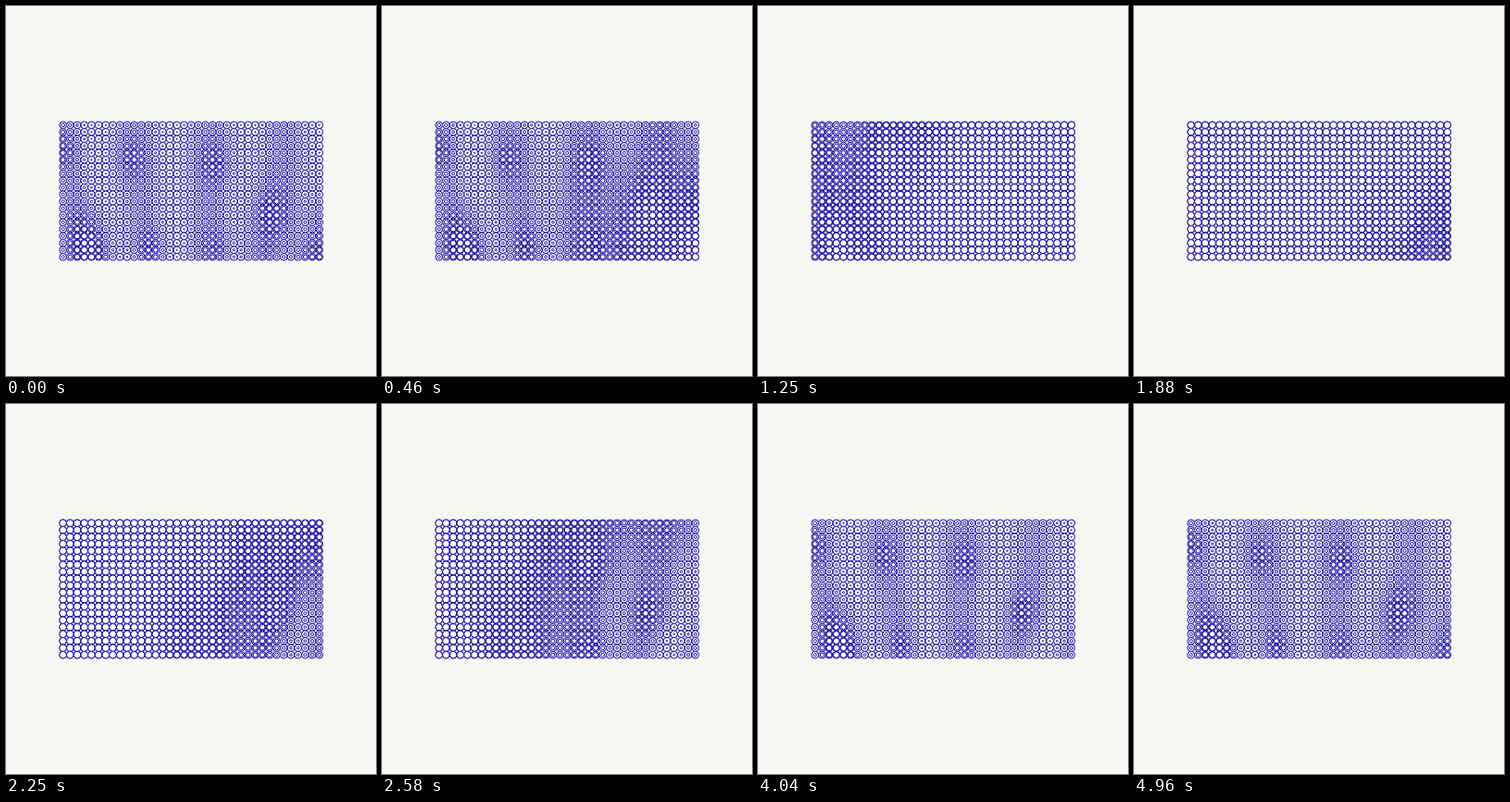
Write an HTML page with a canvas that moves like this. It is 400 by 400 pixels and loops after 5 s.

```html
<!DOCTYPE html>
<html lang="en">
<head>
<meta charset="utf-8">
<title>Ring wave</title>
<style>
  html, body { margin: 0; width: 100%; height: 100%; overflow: hidden; background: #f7f6f2; }
  canvas { display: block; width: 400px; height: 400px; }
</style>
</head>
<body>
<canvas id="stage"></canvas>
<script>
const LOOP = 5000, COLS = 37, ROWS = 20;
const STEP_X = 7.7, STEP_Y = 7.5;
const WIDTH = (COLS - 1) * STEP_X, HEIGHT = (ROWS - 1) * STEP_Y;
const LEFT = 200.2 - WIDTH / 2, TOP = 200 - HEIGHT / 2;
const RADIUS = 3.8, PEAK = 940, SPEED = 0.22;

// Denser spots: x, y, size
const SPOTS = [
  [84, 265, 26],
  [61, 155, 14],
  [135, 165, 15],
  [226, 170, 16],
  [286, 224, 17],
  [157, 260, 14],
  [230, 262, 15]
];

// Resting size: upright bands that narrow towards the bottom, plus the spots
function restSize(x, y) {
  const depth = (y - TOP) / HEIGHT;
  const spread = (x - 200) * (1 + 0.3 * depth ** 2);
  const band = 0.5 + 0.5 * Math.cos((spread - 20) / 80 * Math.PI * 2);
  let size = 0.14 + 0.3 * band;
  for (const [sx, sy, s] of SPOTS) {
    const q = ((x - sx) / s) ** 2 + ((y - sy) / (1.2 * s)) ** 2;
    size += s / 55 * Math.exp(-0.7 * q);
  }
  return Math.min(size, 0.87);
}

const cells = [];
for (let row = 0; row < ROWS; row++) {
  for (let col = 0; col < COLS; col++) {
    const x = LEFT + col * STEP_X, y = TOP + row * STEP_Y;
    const distance = Math.hypot(LEFT + WIDTH - x, TOP + HEIGHT - y);
    cells.push({ x, y, rest: restSize(x, y), peak: PEAK + distance / SPEED });
  }
}

const canvas = document.getElementById("stage");
const ctx = canvas.getContext("2d");
const dpr = window.devicePixelRatio || 1;
canvas.width = canvas.height = 400 * dpr;
ctx.scale(dpr, dpr);

const smooth = u => u * u * (3 - 2 * u);

function ring(x, y, r) {
  ctx.beginPath();
  ctx.arc(x, y, r, 0, Math.PI * 2);
  ctx.fill();
  ctx.stroke();
}

function draw(time) {
  ctx.fillStyle = "#f7f6f2";
  ctx.fillRect(0, 0, 400, 400);
  ctx.fillStyle = "#fff";
  ctx.strokeStyle = "#14069c";
  ctx.lineWidth = 1;
  for (const { x, y, rest, peak } of cells) {
    const swing = 0.5 + 0.5 * Math.cos((time - peak) / LOOP * Math.PI * 2);
    const wave = smooth(swing ** 2);
    ring(x, y, RADIUS);
    ring(x, y, RADIUS * (rest + (1 - rest) * wave));
  }
}

const start = performance.now();
function frame() {
  draw((performance.now() - start) % LOOP);
  requestAnimationFrame(frame);
}
frame();
</script>
</body>
</html>
```
